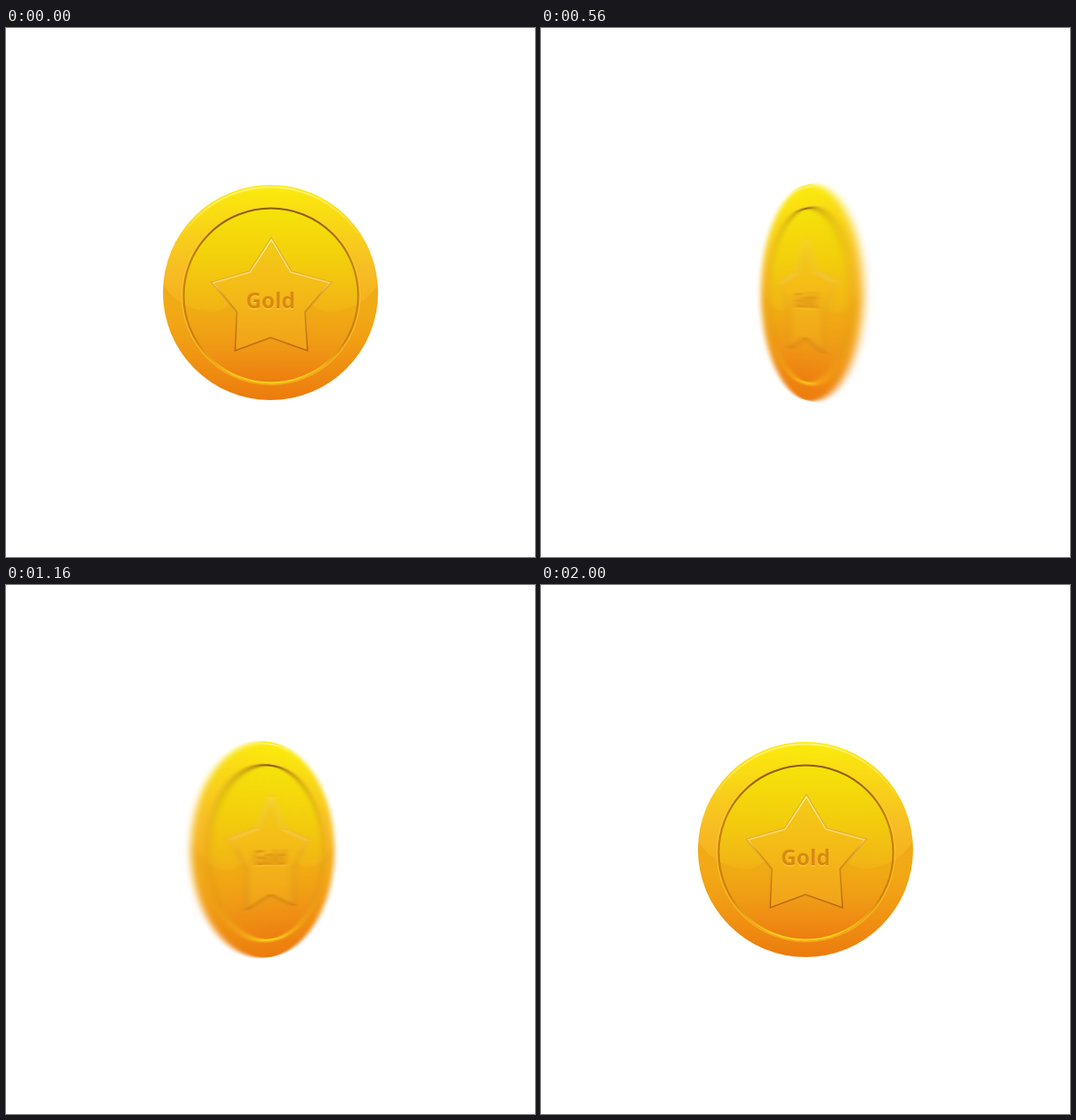
An HTML page that plays this animation: 600 by 600 pixels, repeating every 2240 ms.

```html
<!DOCTYPE html>
<html lang="en">
<head>
<meta charset="utf-8">
<title>Spinning coin</title>
<style>
  html, body { margin: 0; width: 100%; height: 100%; overflow: hidden; background: #fff; }
  #stage { position: relative; width: 600px; height: 600px; overflow: hidden; perspective: 833px; }
  svg { display: block; width: 600px; height: 600px; }
  text { font: 700 24.5px "Open Sans", "Noto Sans", sans-serif; text-anchor: middle; }
</style>
</head>
<body>
<div id="stage">
<svg id="coin" viewBox="0 0 600 600">
  <defs>
    <filter id="smear" filterUnits="userSpaceOnUse" x="120" y="170" width="360" height="260" color-interpolation-filters="sRGB">
      <feGaussianBlur id="blur" stdDeviation="0 0"/>
    </filter>
    <linearGradient id="rim" x2="0" y2="1">
      <stop offset="0" stop-color="#fbec0c"/>
      <stop offset=".16" stop-color="#f9d814"/>
      <stop offset=".4" stop-color="#f7bc25"/>
      <stop offset=".6" stop-color="#f4ae18"/>
      <stop offset="1" stop-color="#ec7b0d"/>
    </linearGradient>
    <linearGradient id="face" x2="0" y2="1">
      <stop offset="0" stop-color="#f5e30a"/>
      <stop offset=".3" stop-color="#f3ce0c"/>
      <stop offset=".55" stop-color="#f2b615"/>
      <stop offset=".78" stop-color="#f09a16"/>
      <stop offset="1" stop-color="#ed7d0f"/>
    </linearGradient>
    <linearGradient id="groove" x2="0" y2="1">
      <stop offset="0" stop-color="#8a5c0a"/>
      <stop offset=".3" stop-color="#c0840c"/>
      <stop offset=".75" stop-color="#d0800e"/>
      <stop offset="1" stop-color="#ffd51c"/>
    </linearGradient>
    <linearGradient id="lip" x2="0" y2="1">
      <stop offset="0" stop-color="#fff27a"/>
      <stop offset=".25" stop-color="#fff27a" stop-opacity="0"/>
    </linearGradient>
    <linearGradient id="shade" gradientUnits="userSpaceOnUse" x1="0" y1="295" x2="0" y2="365">
      <stop offset="0" stop-color="#e8930a" stop-opacity=".35"/>
      <stop offset="1" stop-color="#e8930a" stop-opacity="0"/>
    </linearGradient>
    <linearGradient id="starFill" x2="0" y2="1">
      <stop offset="0" stop-color="#f3cb18"/>
      <stop offset=".45" stop-color="#f4bb17"/>
      <stop offset="1" stop-color="#f1a11a"/>
    </linearGradient>
    <linearGradient id="bevel" x2="0" y2="1">
      <stop offset="0" stop-color="#e0a438"/>
      <stop offset=".45" stop-color="#e0a030"/>
      <stop offset="1" stop-color="#e39218" stop-opacity=".5"/>
    </linearGradient>
    <linearGradient id="starEdge" x2="0" y2="1">
      <stop offset="0" stop-color="#fff3a0"/>
      <stop offset=".38" stop-color="#fbd870"/>
      <stop offset=".5" stop-color="#d8961c"/>
      <stop offset="1" stop-color="#b8660c"/>
    </linearGradient>
    <clipPath id="disc"><circle cx="300" cy="300" r="122"/></clipPath>
    <path id="star" d="M301 240L323 277L367 289L339 322L342 366L300 351L260 366L262 322L235 289L277 277Z"/>
  </defs>
  <g id="art">
    <circle cx="300" cy="300" r="122" fill="url(#rim)"/>
    <circle cx="300" cy="300" r="119.5" fill="none" stroke="url(#lip)" stroke-width="2"/>
    <circle cx="300.5" cy="303.5" r="99" fill="url(#face)"/>
    <path clip-path="url(#disc)" fill="url(#shade)" d="M178 290C190 312 215 322 235 322C246 322 254 312 262 305H338C346 312 354 322 365 322C385 322 410 312 422 290V366H178Z"/>
    <circle cx="300.5" cy="303.5" r="101" fill="none" stroke="#ffd034" stroke-opacity=".5" stroke-width="1.5"/>
    <circle cx="300.5" cy="303.5" r="99" fill="none" stroke="url(#groove)" stroke-width="2.2"/>
    <use href="#star" fill="none" stroke="url(#bevel)" stroke-opacity=".7" stroke-width="4"/>
    <use href="#star" fill="url(#starFill)" stroke="url(#starEdge)" stroke-width="1.4"/>
    <text x="300" y="319" fill="#ffd54a">Gold</text>
    <text x="300" y="318" fill="#d98a10">Gold</text>
  </g>
</svg>
</div>
<script>
const LOOP = 2240, SPIN = 2000, STEP = 40;
const X1 = 0.56, X2 = 0.138;   // easing curve: cubic-bezier(X1, 0, X2, 1)
const SMEAR = 9, SMEAR_PEAK = 0.3;
const coin = document.getElementById("coin");
const art = document.getElementById("art");
const blur = document.getElementById("blur");

const bezier = (s, a, b) => 3 * (1 - s) ** 2 * s * a + 3 * (1 - s) * s * s * b + s ** 3;

function ease(x) {
  let lo = 0, hi = 1;
  for (let i = 0; i < 30; i++) {
    const mid = (lo + hi) / 2;
    if (bezier(mid, X1, X2) < x) lo = mid; else hi = mid;
  }
  return bezier(lo, 0, 1);
}

function draw(ms) {
  const x = Math.min(SPIN, Math.floor(ms % LOOP / STEP) * STEP) / SPIN;
  const moving = x > 0 && x < 1;
  const smear = SMEAR * Math.min(x / SMEAR_PEAK, (1 - x) / (1 - SMEAR_PEAK));

  coin.style.transform = moving ? `rotateY(${-360 * ease(x)}deg)` : "none";
  blur.setAttribute("stdDeviation", `${smear} 0`);
  if (moving) art.setAttribute("filter", "url(#smear)");
  else art.removeAttribute("filter");
}

let start;
function tick(now) {
  start ??= now;
  draw(now - start);
  requestAnimationFrame(tick);
}
draw(0);
requestAnimationFrame(tick);
</script>
</body>
</html>
```
